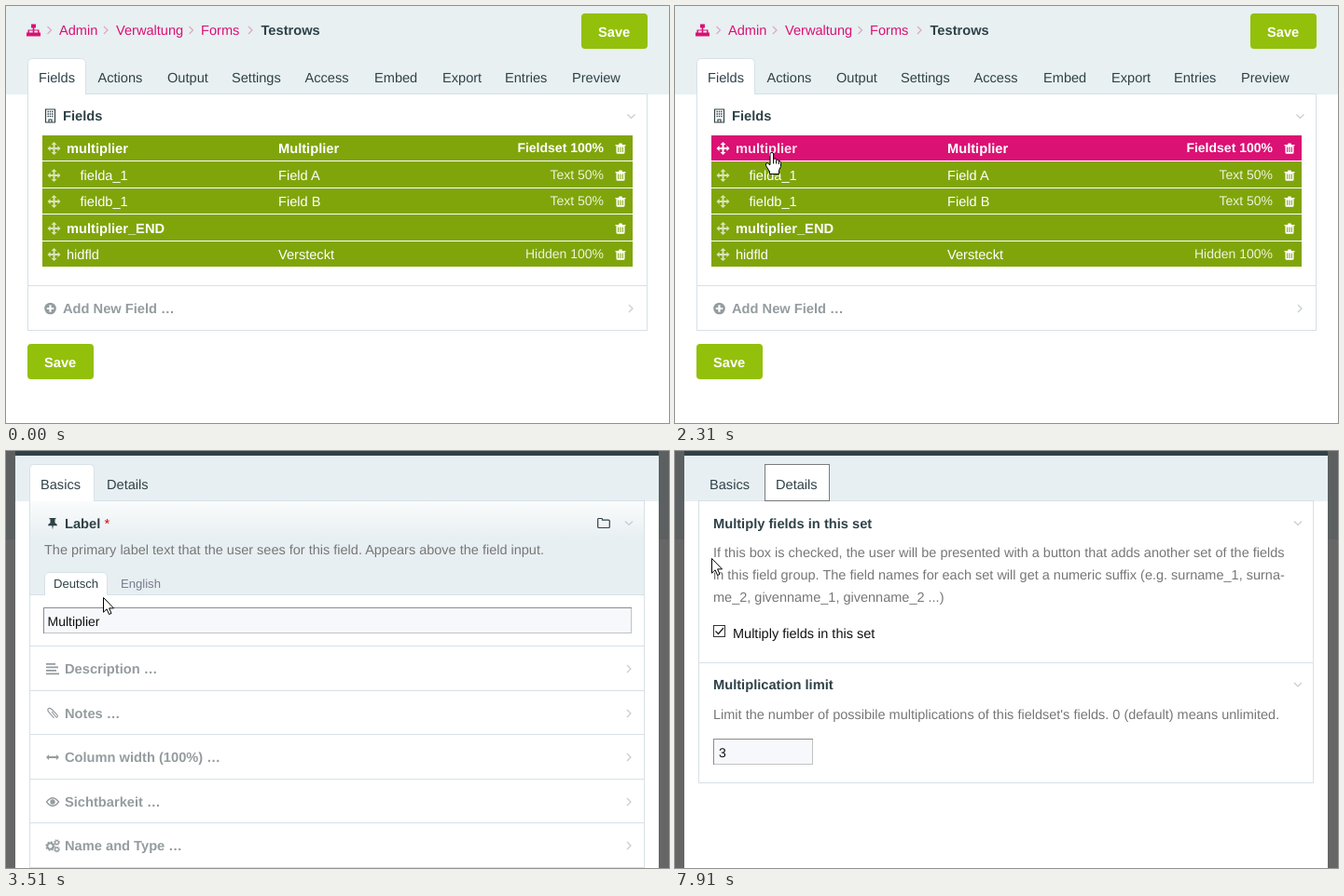
An HTML page that plays this animation: 711 px wide and 448 px high, repeating every 8000 ms.

```html
<!DOCTYPE html>
<html lang="en">
<head>
<meta charset="utf-8">
<title>Form field editor</title>
<style>
html, body { margin: 0; width: 100%; height: 100%; overflow: hidden; background: #fff; }
svg { display: block; width: 100vw; height: 100vh; }
text { font: 14.6px "Liberation Sans", Arial, sans-serif; text-rendering: geometricPrecision; white-space: pre; }
.b { font-weight: bold; font-size: 14.67px; }
.note { font-size: 14.5px; }
.mid { font-size: 14px; }
.small { font-size: 13.1px; }
</style>
</head>
<body>
<svg id="stage" viewBox="0 0 711 448"></svg>
<script>
const INK = '#2f4248', PINK = '#db1174', GREEN = '#80a50b', BUTTON = '#93c00b';
const PALE = '#e8eff2', LINE = '#d6e1e6', GRAY = '#949c9f', NOTE = '#777';
const LOOP = 8000;

// time, scene, hovered part, cursor, x, y
const CUES = [
  [0, 'page'],
  [550, 'page', '', 'arrow', 505, 445],
  [740, 'page', '', 'arrow', 477, 430],
  [930, 'page', '', 'arrow', 421, 392],
  [1130, 'page', 'hidfld', 'move', 298, 283],
  [1330, 'page', 'fielda_1', 'move', 176.5, 183],
  [1520, 'page', 'multiplier', 'move', 124, 161],
  [1730, 'page', 'multiplier', 'move', 138, 165],
  [1920, 'page', 'multiplier link', 'hand', 110, 158],
  [2110, 'page', 'multiplier link', 'hand', 106, 158],
  [2310, 'page', 'multiplier link', 'hand', 104, 158],
  [2920, 'opening', '', 'arrow', 104, 157],
  [3120, 'blank', '', 'arrow', 104, 157],
  [3510, 'basics', '', 'arrow', 104, 157],
  [4720, 'basics', 'heading', 'hand', 115, 69],
  [4930, 'basics', 'tab', 'hand', 122, 45],
  [5110, 'basics', 'tab', 'hand', 124, 36],
  [5720, 'details', 'tab', 'hand', 124, 36],
  [6530, 'details', 'tab', 'hand', 121, 41],
  [6920, 'details', 'tab', 'hand', 121, 42],
  [7120, 'details', 'tab', 'hand', 116, 49],
  [7330, 'details', 'heading', 'hand', 100, 64],
  [7520, 'details', 'heading', 'hand', 82, 74],
  [7720, 'details', 'heading', 'hand', 44, 88],
  [7910, 'details', '', 'arrow', 39, 115],
];

const rect = (x, y, w, h, fill, more = '') =>
  `<rect x="${x}" y="${y}" width="${w}" height="${h}" fill="${fill}" ${more}/>`;
const frame = (x, y, w, h, fill = 'none', stroke = LINE, more = '') =>
  rect(x + .5, y + .5, w - 1, h - 1, fill, `stroke="${stroke}" ${more}`);
const text = (x, y, words, fill = INK, cls = '', more = '') =>
  `<text x="${x}" y="${y}" fill="${fill}" class="${cls}" ${more}>${words}</text>`;
const solid = (d, fill, x = 0, y = 0, more = '') =>
  `<path transform="translate(${x} ${y})" d="${d}" fill="${fill}" ${more}/>`;
const stroke = (d, color, x = 0, y = 0, width = 1.2) =>
  solid(d, 'none', x, y, `stroke="${color}" stroke-width="${width}"`);
const right = (x, y, color = '#c3cdd2') => stroke('M-2-4L2 0-2 4', color, x, y);
const down = (x, y) => stroke('M-4-2L0 2 4-2', '#c3cdd2', x, y);
const tabShape = (x, y, w, h, fill, line = LINE) =>
  solid(`M.5 ${h}V5.5Q.5.5 5.5.5H${w - 5.5}Q${w - .5}.5 ${w - .5} 5.5V${h}`, fill, x, y, `stroke="${line}"`);

const MOVE = 'M0-7L3-4H1V-1H4V-3L7 0 4 3V1H1V4H3L0 7-3 4H-1V1H-4V3L-7 0-4-3V-1H-1V-4H-3Z';

// Icons are drawn around their centre.
const icons = {
  sitemap: c => solid('M-2.5-7h5v4h-1.7v2h5.2v3H7.5v4h-5V2H4.500V0H.8v2h1.700v4h-5V2H-.8V0h-3.700v2h2v4h-5V2H-6v-3h5.200v-2h-1.700z', c),
  building: c => stroke('M-5-7H5V7H-5ZM-1.500 7V4H1.500V7', c) + stroke('M-3-4.500H3M-3-2H3M-3 .5H3', c, 0, 0, '1.4" stroke-dasharray="1.4 .9'),
  trash: c => solid('M-5.500-4H-2L-1.500-5.500H1.500L2-4H5.500V-2.700H4.500V4.500Q4.500 5.700 3.300 5.700H-3.300Q-4.500 5.700-4.500 4.500V-2.700H-5.500ZM-2.800-1.500V4H-1.800V-1.500ZM-.5-1.500V4H.5V-1.500ZM1.800-1.500V4H2.800V-1.500Z', c, 0, 0, 'fill-rule="evenodd"'),
  plus: c => `<circle r="6.300" fill="${c}"/>` + stroke('M-3.700 0H3.700M0-3.700V3.700', '#fff', 0, 0, 2.2),
  pin: c => solid('M-3.500-6H3.500V-4.700H2.500V-.8Q5 .3 5 2.300H.7L0 6.500-.7 2.300H-5Q-5 .3-2.500-.8V-4.700H-3.500Z', c),
  folder: c => stroke('M-6.300-4.200Q-6.300-5-5.500-5H-2.300Q-1.500-5-1.500-4.200V-3.300H5Q6.300-3.300 6.300-2.200V4Q6.300 5 5.200 5H-5.200Q-6.300 5-6.300 4Z', c),
  lines: c => solid('M-7-6H3V-4.300H-7ZM-7-2.500H6V-.8H-7ZM-7 1H4V2.700H-7ZM-7 4.500H7V6.200H-7Z', c),
  clip: c => stroke('M-1-2L3 3Q4.500 5 5.300 3.300 5.600 2.500 4.500 1.200L-1.500-5Q-4-6.500-5.200-4.300-5.500-3-4 -1.300L1.500 4.800', c),
  width: c => solid('M-7 0L-4-3V-1H4V-3L7 0 4 3V1H-4V3Z', c),
  eye: c => stroke('M-6.500 0Q0-8.500 6.500 0 0 8.500-6.500 0Z', c, 0, 0, 1.3) + `<circle r="2.700" fill="${c}"/>`,
  cogs: c => [[-2.5, .5, 3.2], [4.5, -3.5, 1.9], [4.5, 4, 1.9]].map(([x, y, r]) =>
    `<g transform="translate(${x} ${y})" fill="none" stroke="${c}"><circle r="${r}" stroke-width="${r * .65}"/>` +
    `<circle r="${r * 1.4}" stroke-width="1.4" stroke-dasharray="${r * .55}"/></g>`).join(''),
};
const icon = (name, x, y, color) => `<g transform="translate(${x} ${y})">${icons[name](color)}</g>`;

const cursors = {
  arrow: 'M.5.5V16.200L4.100 12.800 6.600 18.500 9 17.400 6.600 11.900H11.500Z',
  hand: 'M-2 12.500V1Q-2-.6-.2-.6T1.600 1V6.200Q4.200 5.300 4.600 7.200 7 6.500 7.300 8.500 9.500 8.300 9.500 10.500V14.500L7.500 18.500V22.500H-2.500V20L-6.200 14Q-7.200 11.500-6 10.800-4.500 10-3 12.500Z',
  move: 'M0-10.500L4-6.500H1.500V-1.500H6.500V-4L10.500 0 6.500 4V1.500H1.500V6.500H4L0 10.500-4 6.500H-1.500V1.500H-6.500V4L-10.500 0-6.500-4V-1.500H-1.500V-6.500H-4Z',
};
function cursor(kind, x, y) {
  if (!kind) return '';
  const knuckles = kind === 'hand' ? stroke('M1.600 6V11.500M4.600 7.500V11.500M7.300 8.500V12', '#000', x, y, 1) : '';
  return solid(cursors[kind], '#fff', x, y, 'stroke="#000" stroke-linejoin="round"') + knuckles;
}

// name, label, type, top, height, baseline, is a fieldset
const ROWS = [
  ['multiplier', 'Multiplier', 'Fieldset 100%', 139, 27, 158, true],
  ['fielda_1', 'Field A', 'Text 50%', 167, 28, 187],
  ['fieldb_1', 'Field B', 'Text 50%', 196, 27, 215],
  ['multiplier_END', '', '', 224, 28, 244, true],
  ['hidfld', 'Versteckt', 'Hidden 100%', 253, 27, 272],
];

function row([name, label, type, top, height, base, fieldset], hover) {
  const [target, link] = hover.split(' ');
  const hot = name === target, cls = fieldset ? 'b' : '';
  const nameColor = hot && link ? '#ffe3f0' : '#fff';
  return rect(39, top, 633, height, hot ? PINK : GREEN) +
    solid(MOVE, '#fff', 51.5, base - 5, `opacity="${hot ? 1 : .7}"`) +
    text(name.startsWith('field') ? 79.5 : 65, base, name, nameColor, cls) +
    text(292, base, label, '#fff', cls) +
    text(641, base - 1, type, fieldset ? '#fff' : '#eef3dd', 'mid', `text-anchor="end" ${fieldset ? 'font-weight="bold" style="font-weight:bold"' : ''}`) +
    icon('trash', 659, base - 5, '#fff');
}

const save = (x, y) => rect(x, y, 71, 38, BUTTON, 'rx="4"') + text(x + 18, y + 24.5, 'Save', '#fff', 'b');

function page(hover = '') {
  const crumbs = [[57, 'Admin'], [118, 'Verwaltung'], [209, 'Forms']];
  const tabs = [[35, 'Fields'], [98.5, 'Actions'], [173, 'Output'], [242, 'Settings'], [320.5, 'Access'],
    [395, 'Embed'], [468, 'Export'], [535, 'Entries'], [607, 'Preview']];
  return rect(0, 0, 711, 448, '#fff') + rect(0, 0, 711, 95, '#e8f0f2') +
    icon('sitemap', 29.5, 26.5, PINK) +
    [46.5, 107, 198.5, 262].map(x => right(x, 26, '#dda6c4')).join('') +
    crumbs.map(([x, s]) => text(x, 31, s, PINK)).join('') +
    text(273.5, 31, 'Testrows', INK, 'b') +
    save(617, 8) + frame(23, 94, 665, 255, '#fff') + tabShape(23, 56, 63, 39, '#fff') +
    tabs.map(([x, s]) => text(x, 82, s)).join('') +
    icon('building', 47.5, 118, INK) + text(61, 123, 'Fields', INK, 'b') + down(670.5, 118.5) +
    ROWS.map(r => row(r, hover)).join('') +
    rect(24, 300, 663, 1, LINE) + icon('plus', 47.5, 325, GRAY) +
    text(61, 330, 'Add New Field …', GRAY, 'b') + right(670, 325) + save(23, 363);
}

const backdrop = () => page() + rect(0, 0, 711, 448, '#000', 'opacity=".6"');
const modal = (body = '') => backdrop() + rect(10, 5, 690, 443, '#fff') + body + rect(10, 0, 690, 5, INK);

const modalTabs = (active, hover) =>
  rect(10, 5, 690, 49, PALE) + frame(25, 53, 660, active === 'Basics' ? 420 : 304, '#fff') +
  (active === 'Basics' ? tabShape(25, 14, 70, 40, '#fff') : '') +
  (hover === 'tab' ? tabShape(96, 15, 69, 39, PINK, PINK)
    : active === 'Details' ? frame(96, 14, 70, 40, '#fff', '#000', 'stroke-dasharray="1 1"') : '') +
  text(37, 41, 'Basics') + text(108, 41, 'Details', hover === 'tab' ? '#fff' : INK);

const input = (x, y, w, h, value) =>
  frame(x, y, w, h, '#f6f8fb', '#c2c2c2') + stroke(`M.5 ${h}V.5H${w}`, '#8c8c8c', x, y, 1) +
  text(x + (w > 200 ? 4.5 : 6), y + 19.5, value, '#111', 'mid');

function basics(hover) {
  const color = hover === 'heading' ? '#000' : INK;
  const closed = [['lines', 'Description …'], ['clip', 'Notes …'], ['width', 'Column width (100%) …'],
    ['eye', 'Sichtbarkeit …'], ['cogs', 'Name and Type …']];
  return modal(modalTabs('Basics', hover) +
    '<defs><linearGradient id="fade" x2="0" y2="1"><stop stop-color="#fafcfc"/>' +
    `<stop offset="1" stop-color="${PALE}"/></linearGradient></defs>` +
    rect(26, 54, 658, 40, 'url(#fade)') + rect(26, 94, 658, 60, PALE) + rect(26, 154, 658, 1, LINE) +
    icon('pin', 50, 78, color) +
    text(63, 83, 'Label', color, 'b') + text(105.5, 83, '*', '#d00') +
    icon('folder', 641, 77.5, color) + down(668, 77.5) +
    text(41, 111, 'The primary label text that the user sees for this field. Appears above the field input.', NOTE, 'note') +
    tabShape(41, 130, 68, 25, '#fff') +
    text(51, 147, 'Deutsch', INK, 'small') + text(123, 147, 'English', '#7b7b90', 'small') +
    input(40, 168, 631, 28, 'Multiplier') +
    closed.map(([name, label], i) => {
      const y = Math.round(234 + i * 47.5);
      return rect(26, y - 25, 658, 1, LINE) + icon(name, 50, y, GRAY) +
        text(63, y + 5, label, GRAY, 'b') + right(668, y);
    }).join('') + rect(26, 447, 658, 1, LINE));
}

function details(hover) {
  const help = ['If this box is checked, the user will be presented with a button that adds another set of the fields',
    'in this field group. The field names for each set will get a numeric suffix (e.g. surname_1, surna-',
    'me_2, givenname_1, givenname_2 ...)'];
  return modal(modalTabs('Details', hover) +
    text(41, 83, 'Multiply fields in this set', hover === 'heading' ? '#000' : INK, 'b') + down(668, 77.5) +
    help.map((s, i) => text(41, 114 + i * 24, s, NOTE, 'note')).join('') +
    frame(41, 187, 13, 13, '#fff', '#333') + stroke('M43.500 193.500L46.500 196.500 52 190', '#222', 0, 0, 1.4) +
    text(62, 201, 'Multiply fields in this set', '#111', 'note') +
    rect(26, 227, 658, 1, LINE) +
    text(41, 256, 'Multiplication limit', INK, 'b') + down(668, 251) +
    text(41, 288, "Limit the number of possibile multiplications of this fieldset's fields. 0 (default) means unlimited.", NOTE, 'note') +
    input(41, 309, 107, 28, '3'));
}

const scenes = {
  page, basics, details,
  opening: () => backdrop() + rect(10, 5, 690, 443, '#fff', 'opacity=".7"') + rect(10, 0, 690, 5, INK),
  blank: () => modal(),
};

const stage = document.getElementById('stage');
let shown;
function draw() {
  const time = performance.now() % LOOP;
  const cue = CUES.findLast(c => c[0] <= time);
  if (cue !== shown) {
    const [, scene, hover = '', kind, x, y] = shown = cue;
    stage.innerHTML = scenes[scene](hover) + cursor(kind, x, y);
  }
  requestAnimationFrame(draw);
}
draw();
</script>
</body>
</html>
```
